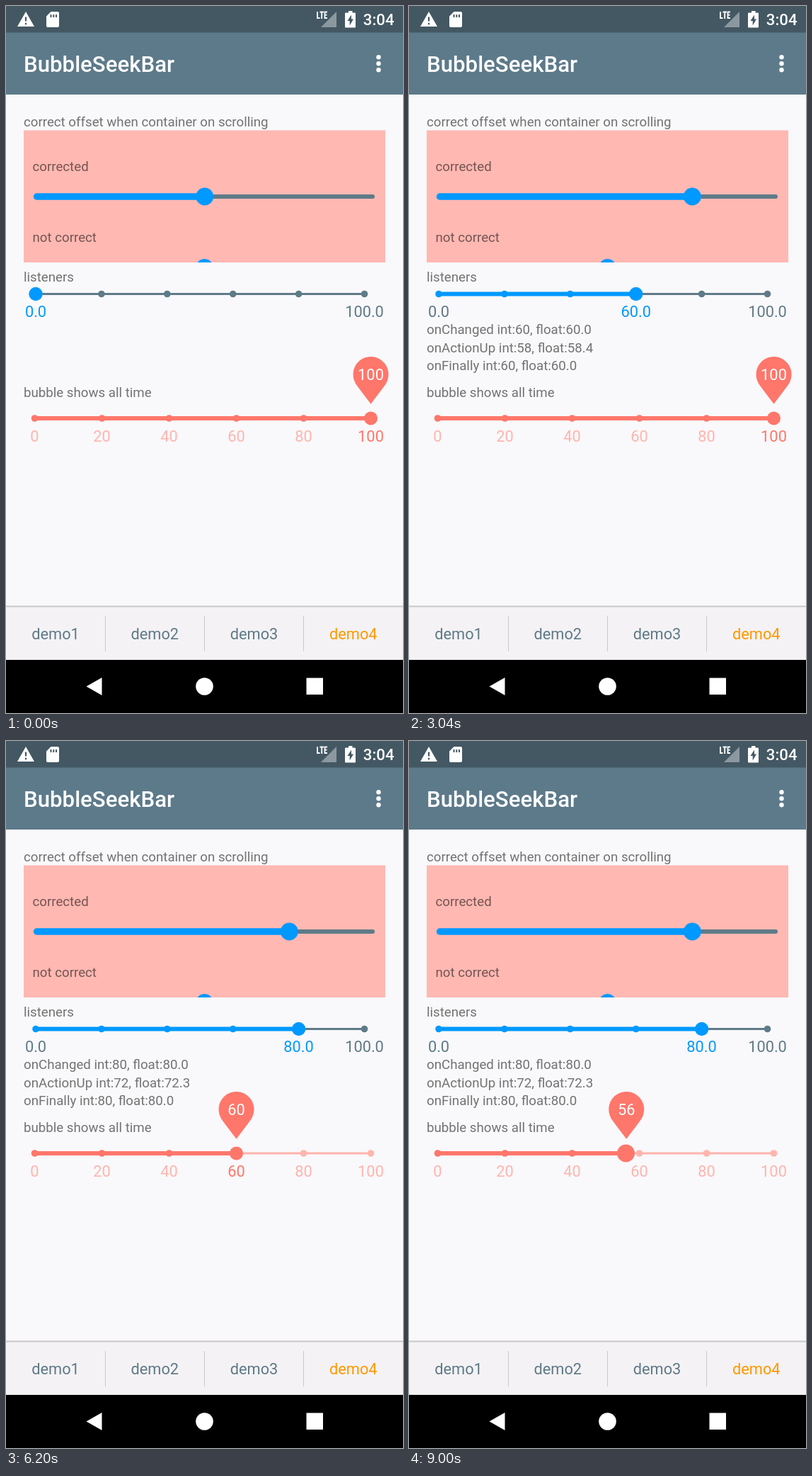
An HTML page with a canvas for the animation above (9040 ms loop, 561 by 998 pixels).

```html
<!DOCTYPE html>
<html lang="en">
<head>
<meta charset="utf-8">
<title>BubbleSeekBar</title>
<style>
  html, body { margin: 0; width: 100%; height: 100%; overflow: hidden; }
  canvas { display: block; }
</style>
</head>
<body>
<canvas id="stage" width="561" height="998"></canvas>
<script>
const LOOP = 9040;
const BLUE = '#0099ff', SLATE = '#5f7a88', RED = '#ff766b', PALE = '#ffb5ae', SOFT = 'rgba(0,0,0,.54)';
const c = document.getElementById('stage').getContext('2d');

// Slider values as [time, value], linear in between
const topKeys = [[79, 50], [80, 75.2]];
const midKeys = [[1399, 0], [1400, 20.5], [1840, 20.5], [2040, 20],
  [2400, 20], [2560, 44], [2720, 58.4], [2840, 58.4], [3040, 60],
  [3560, 60], [3760, 72.3], [3880, 72.3], [4080, 80]];
const lowKeys = [[5600, 100], [5760, 85], [5920, 64], [6000, 63], [6200, 60],
  [6640, 60], [6720, 58.5], [6880, 58], [7040, 44], [7240, 40],
  [7600, 40], [7680, 38], [7840, 37.5], [8000, 32], [8040, 32], [8240, 40],
  [8600, 40], [8760, 45], [9000, 56]];

// Touches as [down, up, settled]
const topTouches = [[80, 480, 600]];
const midTouches = [[1400, 1840, 2040], [2360, 2840, 3040], [3520, 3880, 4080]];
const lowTouches = [[5600, 6000, 6200], [6640, 7040, 7240], [7600, 8040, 8240], [8600, LOOP, LOOP]];

const clamp = v => Math.max(0, Math.min(1, v));
const mix = (a, b, p) => a + (b - a) * p;

function valueAt(keys, t) {
  const i = keys.findIndex(k => k[0] > t);
  if (i < 0) return keys[keys.length - 1][1];
  if (i === 0) return keys[0][1];
  const [t0, a] = keys[i - 1], [t1, b] = keys[i];
  return mix(a, b, (t - t0) / (t1 - t0));
}

const touchAt = (touches, t) => touches.find(([down, , end]) => t >= down && t < end);

function fade(touch, t) {
  const [down, up, end] = touch;
  return clamp((t - down) / 200) * clamp((end - t) / (end - up));
}

function rect(x, y, w, h, color) {
  c.fillStyle = color;
  c.fillRect(x, y, w, h);
}

function disc(x, y, r, color) {
  c.fillStyle = color;
  c.beginPath();
  c.arc(x, y, r, 0, 7);
  c.fill();
}

function shape(d, color) {
  c.fillStyle = color;
  c.fill(new Path2D(d), 'evenodd');
}

function text(s, x, y, size, color, align = 'left', weight = 400) {
  c.font = `${weight} ${size}px Roboto, sans-serif`;
  c.textAlign = align;
  c.fillStyle = color;
  c.fillText(s, x, y);
}

const note = (s, x, y) => text(s, x, y, 18.7, SOFT);
const label = (s, x, y, color) => text(s, x, y, 21.8, color, 'center');

function line(x0, x1, y, width, color) {
  c.strokeStyle = color;
  c.lineWidth = width;
  c.lineCap = 'round';
  c.beginPath();
  c.moveTo(x0, y);
  c.lineTo(x1, y);
  c.stroke();
}

// Draws a seek bar and returns the x of its thumb
function seekBar({ x0, x1, y, thin, thick, back, front, dots }, value, radius) {
  const x = mix(x0, x1, value / 100);
  line(x, x1, y, thin, back);
  line(x0, x, y, thick, front);
  if (dots) for (let p = 0; p <= 100; p += 20)
    disc(mix(x0, x1, p / 100), y, 4.8, p <= value ? front : back);
  disc(x, y, radius, front);
  return x;
}

function bubble(x, top, r, s, color, alpha = 1) {
  const dx = r * Math.sqrt(3) / 2, y = top + r * 1.5, tip = top + r * 8 / 3;
  c.globalAlpha = alpha;
  c.fillStyle = color;
  c.beginPath();
  c.moveTo(x, tip);
  c.quadraticCurveTo(x - dx - 3, y - 3, x - dx, y);
  c.arc(x, top + r, r, Math.PI * 5 / 6, Math.PI / 6);
  c.quadraticCurveTo(x + dx + 3, y - 3, x, tip);
  c.fill();
  label(s, x, top + r + 7.5, '#fff');
  c.globalAlpha = 1;
}

const topBar = { x0: 43.5, x1: 518, y: 269, thin: 6, thick: 9.5, back: SLATE, front: BLUE };
const midBar = { x0: 42, x1: 506.5, y: 406.5, thin: 3.1, thick: 6.2, back: SLATE, front: BLUE, dots: true };
const lowBar = { x0: 40.5, x1: 515.5, y: 582, thin: 3.1, thick: 6.2, back: PALE, front: RED, dots: true };

function chrome() {
  rect(0, 0, 561, 998, '#f9f8fa');
  rect(0, 0, 561, 38, '#435863');
  rect(0, 37.5, 561, 87.5, '#5d7a8a');

  // Status icons
  shape('M28 8L40 29H16ZM26.9 15.5V21.5H29.1V15.5ZM26.9 23.8V26.2H29.1V23.8Z', '#fff');
  shape('M63.5 8H73Q75 8 75 10V28Q75 30 73 30H59Q57 30 57 28V14.5Z' +
    'M62.5 12V16H64.5V12ZM66.3 12V16H68.3V12ZM70 12V16H72V12Z', '#fff');
  shape('M467 8V30H445Z', '#8c989f');
  c.strokeStyle = '#fff';
  c.lineWidth = 1.8;
  c.lineCap = 'butt';
  c.stroke(new Path2D('M440 8V17H443.5M443.5 8.5H449M446.2 8V18M454 8.5H450.5V17H454M450.5 12.7H453.5'));
  shape('M484 7H489.500V9.500H493Q494 9.500 494 10.500V29.500Q494 30.500 493 30.500H480' +
    'Q479 30.500 479 29.500V10.500Q479 9.500 480 9.500H484ZM488 12.500L482.500 21H485.700V27.500L491 18.500H488Z', '#fff');
  text('3:04', 548.5, 27, 22.2, '#fff', 'right', 500);

  text('BubbleSeekBar', 25, 93, 31.2, '#fff', 'left', 500);
  for (const y of [72.3, 81.3, 90.3]) disc(526.5, y, 3.2, '#fff');

  // Tabs
  rect(0, 848, 561, 75, '#f4f2f4');
  rect(0, 846.5, 561, 2, '#c9c8ca');
  for (let i = 0; i < 4; i++) {
    if (i) rect(Math.round(i * 140.25 - 0.3), 861, 1, 50, '#cac8ca');
    label('demo' + (i + 1), 70 + i * 140.25, 894, i === 3 ? '#ff9800' : SLATE);
  }

  // Navigation
  rect(0, 923, 561, 75, '#000');
  shape('M113.500 960.500L135.500 948V973Z', '#fff');
  disc(280.5, 960.5, 12.3, '#fff');
  rect(424.5, 948.5, 23.5, 23.5, '#fff');
}

function scrollPanel(t) {
  note('correct offset when container on scrolling', 25, 170);
  rect(25, 175.5, 511, 186.5, '#ffb8b2');
  note('corrected', 37.5, 233);
  note('not correct', 37.5, 333);
  c.save();
  c.beginPath();
  c.rect(25, 175, 511, 187);
  c.clip();
  disc(280.5, 369.5, 12.5, BLUE);
  c.restore();
  return seekBar(topBar, valueAt(topKeys, t), touchAt(topTouches, t) ? 15.5 : 12.5);
}

const report = (name, v, y) => note(`${name} int:${Math.round(v)}, float:${v.toFixed(1)}`, 25, y);

function listeners(t) {
  const touch = touchAt(midTouches, t), value = valueAt(midKeys, t);
  note('listeners', 25, 389);
  const x = seekBar(midBar, value, touch ? 12.5 : 9.7);
  label('0.0', midBar.x0, 439, touch || value > 0 ? SLATE : BLUE);
  label('100.0', midBar.x1, 439, SLATE);
  if (!touch && value > 0) label(value.toFixed(1), x, 439, BLUE);

  // The change callback trails the thumb slightly
  if (t >= 1400) report('onChanged', touch ? valueAt(midKeys, t - 40) : value, 463);
  const released = midTouches.filter(m => t >= m[1]).pop();
  const settled = midTouches.filter(m => t >= m[2]).pop();
  if (released) report('onActionUp', valueAt(midKeys, released[1]), 488.5);
  if (settled) report('onFinally', valueAt(midKeys, settled[2]), 514);
  return { x, value, touch };
}

function alwaysShown(t) {
  const touch = touchAt(lowTouches, t), value = valueAt(lowKeys, t);
  note('bubble shows all time', 25, 552);
  const x = seekBar(lowBar, value, touch ? 12.5 : 9.5);
  for (let p = 0; p <= 100; p += 20)
    label(p, mix(lowBar.x0, lowBar.x1, p / 100), 614.5, !touch && p === value ? RED : PALE);
  bubble(x + (touch ? 0.7 : 0), 495, 25, Math.round(value), RED);
}

function draw(t) {
  chrome();
  const topX = scrollPanel(t);
  const mid = listeners(t);
  alwaysShown(t);
  const tap = touchAt(topTouches, t);
  if (tap) bubble(topX, 180, 25, '75', BLUE, fade(tap, t));
  if (mid.touch) bubble(mid.x, 296, 32.3, mid.value.toFixed(1), BLUE, fade(mid.touch, t));
}

const start = performance.now();
function tick() {
  draw((performance.now() - start) % LOOP);
  requestAnimationFrame(tick);
}
tick();
</script>
</body>
</html>
```
